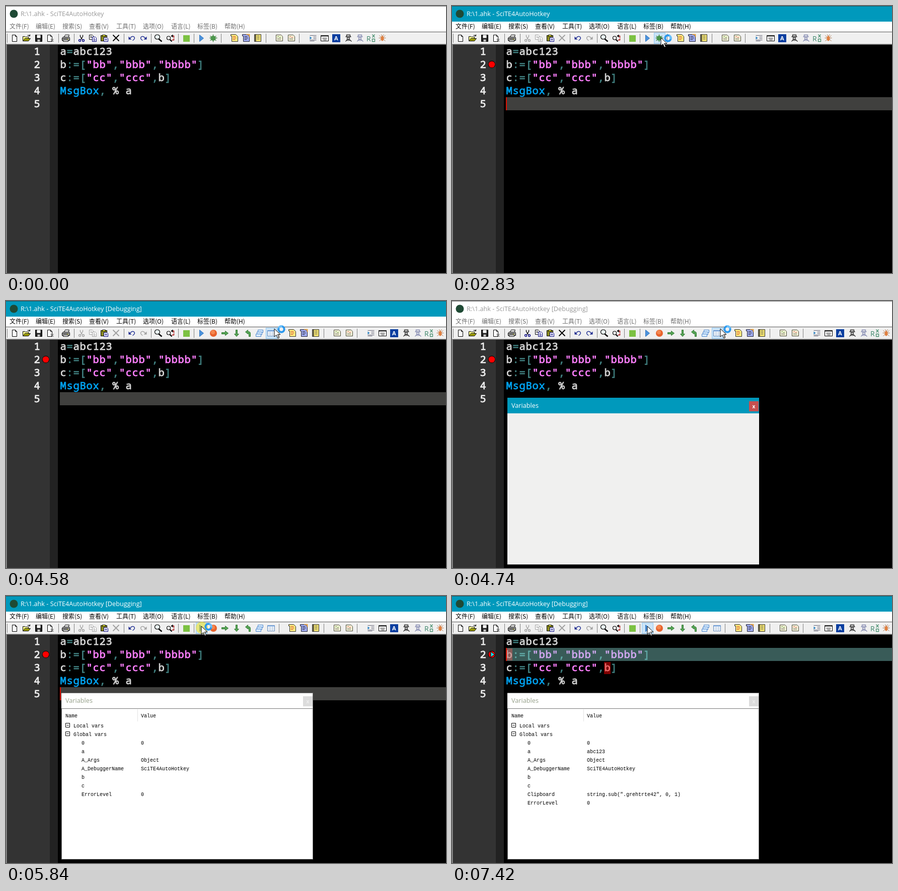
Write an HTML page with a canvas that moves like this. It is 874x530 px and loops after 8 s.

```html
<!DOCTYPE html>
<html lang="zh">
<head>
<meta charset="utf-8">
<style>
html, body { margin: 0; width: 100%; height: 100%; overflow: hidden; background: #000; }
canvas { display: block; }
</style>
</head>
<body>
<canvas id="stage" width="874" height="530"></canvas>
<script>
const ctx = document.getElementById('stage').getContext('2d');
const UI = '"Open Sans", "Noto Sans", sans-serif';
const CJK = '"Noto Sans CJK SC", "Noto Sans CJK", sans-serif';
const MONO = '"Noto Sans Mono", monospace';
const LIST = '"Liberation Mono", monospace';
const LOOP = 8000;

function rect(x, y, w, h, color) {
  ctx.fillStyle = color;
  ctx.fillRect(x, y, w, h);
}

function text(str, x, y, font, color) {
  ctx.font = font;
  ctx.fillStyle = color;
  ctx.fillText(str, x, y);
}

function disc(x, y, r, color) {
  ctx.fillStyle = color;
  ctx.beginPath();
  ctx.arc(x, y, r, 0, 7);
  ctx.fill();
}

// Each part is [path, fill, stroke, line width].
function shape(x, y, parts) {
  ctx.save();
  ctx.translate(x, y);
  for (const [d, fill, stroke, width = 1] of parts) {
    const path = new Path2D(d);
    if (fill) { ctx.fillStyle = fill; ctx.fill(path); }
    if (stroke) { ctx.strokeStyle = stroke; ctx.lineWidth = width; ctx.stroke(path); }
  }
  ctx.restore();
}

const icon = (x, ...parts) => shape(x - 7.5, 56.5, parts);

const PAGE = ['M2 1h6l3 3v10H2zM8 1v3h3', '#fff', '#000'];

function editIcons(active) {
  const ink = active ? '#a0a0a0' : '#000';
  const blue = active ? '#a0a0a0' : '#000080';
  icon(18, PAGE);
  icon(41, ['M0 12V4h4l1 1h6v3', '#ffff90', '#000'], ['M0 13L4 8h11l-4 5z', '#a0a000', '#000'],
    ['M9 2q3-2 5 1M14 0v3h-3', null, '#000']);
  icon(65, ['M1 1h13v13H1z', '#222', '#000'], ['M4 1h7v6H4z', '#fff'], ['M5 10h5v4H5z', '#ccc']);
  icon(88, PAGE, ['M8 9l6 5M14 9l-6 5', null, '#777', 1.3]);
  icon(119, ['M4 6l2-5h8l-2 5', '#fff', '#000'], ['M0 7l2-2h12l1 2v5H0z', '#aaa', '#000'],
    ['M2 11h10v3H2zM1 8h12', '#fff', '#000'], ['M10 9h2v1h-2z', '#dd0']);
  icon(150, ['M5 1v3l4 6M10 1v3l-4 6', null, ink, 1.3],
    ['M6 12a2 2 0 1 1-4 0a2 2 0 1 1 4 0M13 12a2 2 0 1 1-4 0a2 2 0 1 1 4 0', null, blue, 1.3]);
  icon(173, ['M0 1h6l2 2v7H0zM2 4h3M2 6h4', '#fff', ink],
    ['M6 5h6l2 2v7H6zM8 8h3M8 10h4M8 12h4', '#fff', blue]);
  icon(196, ['M0 2h12v11H0z', '#8a8a20', '#000'], ['M3 1h6v3H3z', '#ee3', '#000'],
    ['M6 6h6l2 2v6H6zM8 9h4M8 11h4', '#fff', '#000080']);
  icon(219, ['M1 1l12 12M13 1L1 13', null, ink, 1.8]);
  icon(250, ['M4 7Q9 2 12 5T9 12', null, '#1a2a90', 1.4], ['M1 4v6h6z', '#1a2a90']);
  icon(273, ['M11 7Q6 2 3 5T6 12', null, active ? '#a0a0a0' : '#1a2a90', 1.4],
    ['M14 4v6H8z', active ? '#a0a0a0' : '#1a2a90']);
  icon(303, ['M10 5a5 4.500 0 1 1-10 0a5 4.500 0 1 1 10 0', '#e8f4f4', '#000', 1.2],
    ['M8 9l6 5', null, '#000', 2.6]);
  icon(327, ['M7 7a3.500 3.500 0 1 1-7 0a3.500 3.500 0 1 1 7 0', '#fff', '#000', 1.2],
    ['M6 10l4 4', null, '#000', 2.2], ['M9 3h5v4M14 8v3h-4', null, '#a00', 1.3],
    ['M12 0v6l-4-3z', '#000']);
  rect(352, 58, 13, 13, '#7cc142');
}

function debugIcons(debugging) {
  icon(388, ['M4 1l8 6.500l-8 6.500z', '#4e94dc', '#2a72c0']);
  if (!debugging) {
    icon(412, ['M1 3l12 9M1 12l12-9M7 0v15M0 7h15', null, '#3f7d3f', 1.3],
      ['M12 7.500a5 5 0 1 1-10 0a5 5 0 1 1 10 0', '#4b964b']);
    return;
  }
  disc(412, 64, 7, '#e8622c');
  disc(411, 62, 4, '#f58850');
  const green = '#56a556', dark = '#347a34';
  icon(435, ['M1 6h7V3l6 4.500l-6 4.500V9H1z', green, dark]);
  icon(458, ['M6 1v8H3l4.500 5l4.500-5H9V1z', green, dark]);
  icon(481, ['M12 14V8q0-4-5-4V1L2 5l5 4V7q2 0 2 7z', green, dark]);
  for (let i = 0; i < 3; i++) {
    icon(504, [`M${4 - i * 2} ${1 + i * 4}h10v5h-10z`, '#d8ebff', '#4d86cc']);
  }
  icon(527, ['M0 2h14v11H0z', '#fff', '#5b83b8'], ['M0 2h14v2H0z', '#79a7df'],
    ['M0 7h14M0 10h14M5 4v9M10 4v9', null, '#b4c8e0']);
}

function person(x, color) {
  icon(x, ['M4 4V1h7v3M2 4.500h11', null, color, 1.3], ['M5 6h5v3H5z', '#eee', color],
    ['M2 14l3-4h5l4 4M4 12h7', null, color, 1.2]);
}

function toolIcons(shift) {
  const at = x => x + shift;
  const lines = 'M4 4h6M4 7h7M4 10h5';
  icon(at(454), ['M0 0h10l4 4v10H2V3H0z', '#ffec80', '#333'], [lines, null, '#d04020']);
  icon(at(477), ['M0 0h10l4 4v10H2V3H0z', '#a0acf0', '#223'], [lines, null, '#223'],
    ['M8 0h6v5', null, '#e09020', 1.6]);
  icon(at(500), ['M1 0h13v14H1z', '#f0e070', '#333'], ['M3 0v14', null, '#333', 2],
    ['M6 3h5M6 6h5M6 9h5', null, '#665']);
  for (const [x, color] of [[543, '#497c28'], [567, '#c04030']]) {
    icon(at(x), ['M1 1h10l3 3v9H1z', '#fffde0', '#443'], ['M3 5l3-1l2 2l3-1', null, color],
      ['M3 8h8M3 10h8', null, '#887']);
  }
  icon(at(610), ['M1 2h13M8 5h6M8 8h6M1 11h13M1 13h9', null, '#667'], ['M1 4l4 3l-4 3z', '#2a80c0']);
  icon(at(633), ['M0 2h15v11H0z', '#fff', '#000'], ['M0 2h15v2H0z', '#333'],
    ['M3 7h9M3 9h9M5 11h6', null, '#555']);
  rect(at(648), 56, 16, 16, '#0b3fa0');
  text('A', at(652), 68, `bold 11px ${UI}`, '#fff');
  person(at(680), '#222');
  person(at(703), '#8288b0');
  text('R', at(716), 70, `14px ${UI}`, '#3a8468');
  icon(at(727), ['M8 0l5 6M13 0l-5 6M8 9h5v5H8z', null, '#4a9070', 1.3]);
  icon(at(748), ['M1 2l12 11M1 13L13 2M0 7h14M5 0l2 4l3-4', null, '#b07850'],
    ['M10 8a3 5 0 1 1-6 0a3 5 0 1 1 6 0', '#e08040']);
}

const MENU = [[7, '文件(F)'], [59, '编辑(E)'], [112, '搜索(S)'], [165, '查看(V)'], [219, '工具(T)'],
  [272, '选项(O)'], [328, '语言(L)'], [380, '标签(B)'], [434, '帮助(H)']];
const BUTTONS = [388, 412, 435, 458, 481, 504, 527];

function drawChrome(active, debugging, titled, cursor) {
  rect(0, 0, 874, 75, '#fff');
  rect(0, 0, 874, 31, active ? '#0099bc' : '#fff');
  rect(0, 0, 874, 1, active ? '#16606f' : '#777');
  disc(15.5, 15.5, 8, '#1f4a35');
  text('R:\\1.ahk - SciTE4AutoHotkey' + (titled ? ' [Debugging]' : ''), 29, 20,
    `12.7px ${UI}`, active ? '#fff' : '#999');
  for (const [x, label] of MENU) text(label, x, 45, `12px ${CJK}`, active ? '#000' : '#6d6d6d');
  rect(0, 51, 874, 1, '#555');
  rect(0, 52, 874, 23, '#f0f0f0');

  const shift = debugging ? 115 : 0;
  const marks = [2, 104, 135, 234, 288, 342, 373, 427 + shift, 516 + shift, 582 + shift];
  for (const x of marks) rect(x, 55, 1, 18, '#808080');

  const hover = cursor && cursor.y > 52 && cursor.y < 76 &&
    BUTTONS.slice(0, debugging ? 7 : 2).find(x => Math.abs(cursor.x - x) < 12);
  if (hover) {
    rect(hover - 11, 53, 23, 22, '#90c8f6');
    rect(hover - 10, 54, 21, 20, '#cce4f7');
  }
  editIcons(active);
  debugIcons(debugging);
  toolIcons(shift);
}

const CODE = ['a=abc123', 'b:=["bb","bbb","bbbb"]', 'c:=["cc","ccc",b]', 'MsgBox, % a', ''];
const rowTop = row => 77 + 26 * (row - 1);

// A thin outline thickens the regular weight to a semibold.
function drawCode(row, col, color, str) {
  const x = 107.4 + 13 * col, y = rowTop(row) + 20.3;
  ctx.letterSpacing = '0.7px';
  text(str, x, y, `20.5px ${MONO}`, color);
  ctx.strokeStyle = color;
  ctx.lineWidth = .8;
  ctx.strokeText(str, x, y);
  ctx.letterSpacing = '0px';
}

function drawEditor(t, active) {
  const paused = t >= 6160;
  rect(0, 75, 874, 455, '#a0a0a0');
  rect(1, 76, 873, 454, '#696969');
  rect(2, 77, 872, 453, '#000');
  rect(2, 77, 85, 453, '#333');
  rect(87, 77, 16, 453, '#222');
  if (active && !paused) rect(107, 181, 767, 26, '#40403e');

  CODE.forEach((line, i) => {
    drawCode(i + 1, -4, '#f0f0f0', i + 1);
    for (const token of line.matchAll(/"[^"]*"|MsgBox|[\w% ]+|[^\w"% ]+/g)) {
      const str = token[0];
      const operator = /^[^\w"% ]/.test(str);
      const color = operator ? '#408080' : str[0] === '"' ? '#ff80ff' : str === 'MsgBox' ? '#00a2f0' : '#d8d8d8';
      drawCode(i + 1, token.index, color, str);
    }
  });

  if (t >= 6460) {
    rect(107, 104, 13, 24, 'rgba(255,0,0,.5)');
    rect(302, 131, 13, 24, 'rgba(255,0,0,.5)');
  }
  if (paused) rect(107, 103, 767, 26, 'rgba(142,228,220,.4)');
  if (t >= 1230) {
    disc(79, 116, 7.2, '#000');
    disc(79, 116, 6.3, '#f00');
    if (paused) shape(0, 0, [['M77 110.500L84.500 116L77 121.500z', '#20e8f0', '#000']]);
  }
  const shown = [[1230, 1750], [2220, 2840], [3320, 3950], [5840, 6920], [7420, LOOP]];
  if (shown.some(([from, to]) => t >= from && t < to)) rect(107, paused ? 103 : 181, 2, 26, '#e01000');
}

function variables(updated) {
  const list = [['0', '0'], ['a', updated ? 'abc123' : ''], ['A_Args', 'Object'],
    ['A_DebuggerName', 'SciTE4AutoHotkey'], ['b', ''], ['c', ''], ['ErrorLevel', '0']];
  if (updated) list.splice(6, 0, ['Clipboard', 'string.sub(".grehtrte42", 0, 1)']);
  return list;
}

function drawVariables(t, active) {
  const row = (str, x, y) => text(str, x, y + 3.5, `10px ${LIST}`, '#000');
  rect(110, 192, 500, 331, active ? '#0099bc' : '#777');
  if (!active) rect(110, 193, 499, 30, '#fff');
  text('Variables', 118, 212, `12.7px ${UI}`, active ? '#fff' : '#96a08a');
  rect(590, 199, 19, 20, active ? '#c75050' : '#dcdcdc');
  text('x', 596.5, 213, `bold 10px ${UI}`, active ? '#fff' : '#eee');
  if (t < 5040) {
    rect(110, 223, 500, 300, '#f0f0ef');
    return;
  }
  rect(110, 223, 500, 300, '#777');
  rect(111, 224, 498, 298, '#fff');
  rect(261, 225, 1, 24, '#e2e2e2');
  rect(607, 225, 1, 24, '#e2e2e2');
  row('Name', 118, 237);
  row('Value', 268, 237);
  ['Local vars', 'Global vars'].forEach((label, i) => {
    const y = 257 + 17 * i;
    shape(118.5, y - 4.5, [['M0 0h8v8H0zM2 4h4', null, '#000']]);
    row(label, 134, y);
  });
  variables(t >= 6310).forEach(([name, value], i) => {
    row(name, 150, 291 + 17 * i);
    row(value, 268, 291 + 17 * i);
  });
}

// The pointer moves in discrete steps: [start, end, steps, from, to].
const MOVES = [
  [150, 770, 4, [413, 485], [77, 117]],
  [2060, 2690, 4, [77, 117], [415, 63]],
  [3160, 3640, 3, [415, 63], [583, 66]],
  [3640, 4110, 3, [583, 66], [533, 55]],
  [5350, 5670, 2, [533, 55], [388, 60]],
];

function cursorAt(t) {
  const move = MOVES.filter(m => t >= m[0]).pop();
  if (!move) return null;
  const [start, end, steps, from, to] = move;
  const p = Math.min(steps, Math.floor((t - start) / (end - start) * steps + (steps > 3 ? .01 : 1))) / steps;
  const ease = p * p * (3 - 2 * p);
  return { x: from[0] + (to[0] - from[0]) * ease, y: from[1] + (to[1] - from[1]) * ease };
}

function drawCursor(t, { x, y }) {
  const clicked = [[1230, 1420], [2690, 2830], [4420, 4580], [5840, 6000]]
    .some(([from, to]) => t >= from && t < to);
  if (clicked) disc(x + 1, y + (y > 77 ? -1 : 3), 12, 'rgba(255,230,0,.5)');
  if (y > 77 && x > 103) {
    shape(x, y, [['M-3.500-8.500h3l.5 1l.5-1h3M0-8v16M-3.500 8.500h3l.5-1l.5 1h3', null, '#eee']]);
    return;
  }
  ctx.save();
  ctx.translate(x, y);
  if (y > 77) ctx.scale(-1, 1);
  shape(0, 0, [['M0 0v16l4-3.500l3 6.500l2.500-1l-3-6.500h5.500z', '#fff', '#000']]);
  ctx.restore();
  if (t < 2830 || t >= 6460) return;
  ctx.lineWidth = 4;
  ctx.strokeStyle = '#2c98ec';
  ctx.beginPath();
  ctx.arc(x + 14, y + 1, 5.7, 0, 7);
  ctx.stroke();
  const angle = t / 160;
  ctx.strokeStyle = '#6cc0fa';
  ctx.beginPath();
  ctx.arc(x + 14, y + 1, 5.7, angle, angle + 1.5);
  ctx.stroke();
}

function draw(t) {
  const active = t >= 1230 && t < 4740 || t >= 5840;
  const cursor = cursorAt(t);
  drawEditor(t, active);
  drawChrome(active, t >= 3000, t >= 3160, cursor);
  if (t >= 4740) drawVariables(t, !active);
  if (cursor) drawCursor(t, cursor);
}

function tick() {
  draw(performance.now() % LOOP);
  requestAnimationFrame(tick);
}
tick();
</script>
</body>
</html>
```
